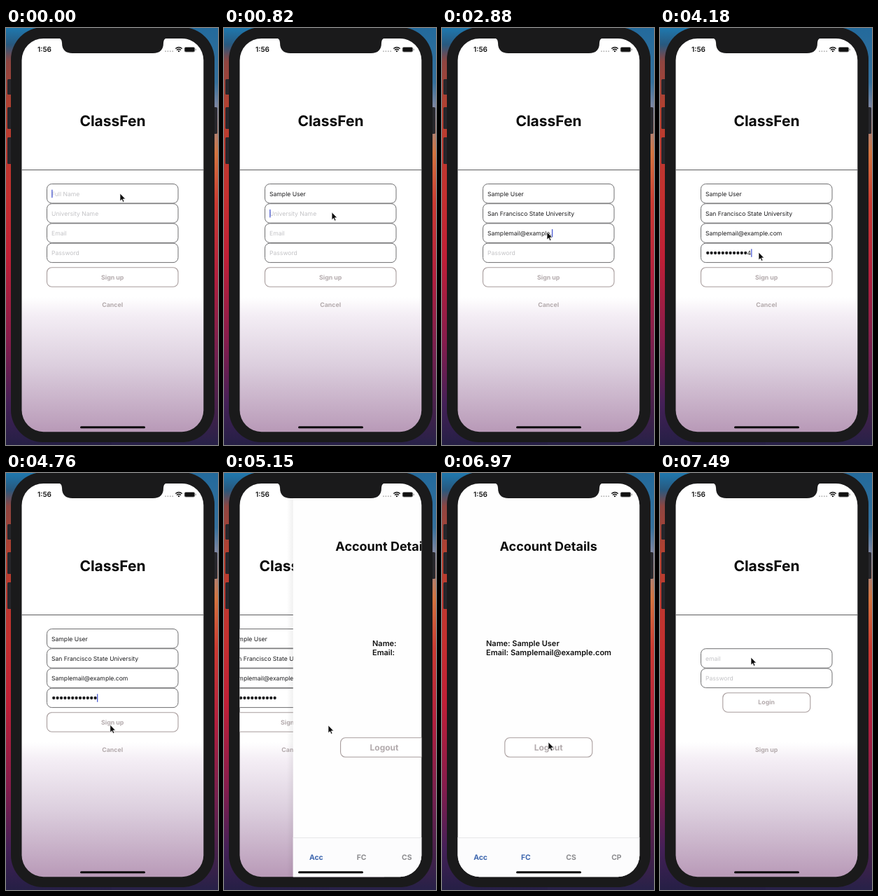
These frames come from a looping animation (303x595 px, 7550 ms). An HTML page:

```html
<!DOCTYPE html>
<html lang="en">
<head>
<meta charset="utf-8">
<title>Sign-up demo</title>
<style>
  html, body { margin: 0; width: 100%; height: 100%; overflow: hidden; background: #1a1a1b; }
  svg { display: block; width: 100%; height: 100%; }
  text { font-family: Inter, "Liberation Sans", sans-serif; white-space: pre; text-rendering: geometricPrecision; }
  .mid { text-anchor: middle; }
  .title { font-size: 21px; font-weight: 700; fill: #080808; }
  .head { font-size: 18px; font-weight: 700; fill: #0c0c0c; }
  .input { font-size: 8.6px; fill: #1c1c1e; }
  .hint { fill: #c3c3c6; }
  .link { font-size: 8.8px; font-weight: 700; fill: #b4abad; }
  .logout { font-size: 12px; font-weight: 700; fill: #b3abad; }
  .info { font-size: 11px; font-weight: 600; fill: #111; }
  .tab { font-size: 10.4px; font-weight: 700; fill: #8d8d90; }
  .tab.on { fill: #3d66ae; }
  .clock { font-size: 10px; font-weight: 600; fill: #111; }
  .box { fill: #fff; stroke: #6e6e70; }
  .btn { fill: #fff; stroke: #a89d9d; stroke-width: 1.1; }
</style>
</head>
<body>
<svg viewBox="0 0 303 595" preserveAspectRatio="none">
  <defs>
    <linearGradient id="wallL" x1="0" y1="0" x2="0" y2="1">
      <stop offset="0" stop-color="#1f78ae"/>
      <stop offset=".04" stop-color="#28597f"/>
      <stop offset=".08" stop-color="#8f4540"/>
      <stop offset=".2" stop-color="#b5402f"/>
      <stop offset=".4" stop-color="#c4302f"/>
      <stop offset=".55" stop-color="#c01f36"/>
      <stop offset=".75" stop-color="#861c4c"/>
      <stop offset=".9" stop-color="#442057"/>
      <stop offset="1" stop-color="#251f45"/>
    </linearGradient>
    <linearGradient id="wallR" x1="0" y1="0" x2="0" y2="1">
      <stop offset="0" stop-color="#236a9c"/>
      <stop offset=".13" stop-color="#34709c"/>
      <stop offset=".2" stop-color="#8b8aa2"/>
      <stop offset=".3" stop-color="#d3743f"/>
      <stop offset=".42" stop-color="#cb3a32"/>
      <stop offset=".6" stop-color="#b21f3e"/>
      <stop offset=".78" stop-color="#74204f"/>
      <stop offset="1" stop-color="#272148"/>
    </linearGradient>
    <linearGradient id="haze" gradientUnits="userSpaceOnUse" x1="0" y1="384" x2="0" y2="577">
      <stop offset="0" stop-color="#fff"/>
      <stop offset=".13" stop-color="#f4eef5"/>
      <stop offset=".5" stop-color="#dccfde"/>
      <stop offset="1" stop-color="#b899b7"/>
    </linearGradient>
    <linearGradient id="shade">
      <stop offset="0" stop-color="#000" stop-opacity="0"/>
      <stop offset="1" stop-color="#000" stop-opacity=".06"/>
    </linearGradient>
    <clipPath id="screen"><rect x="22.5" y="15" width="259.8" height="561.2" rx="31"/></clipPath>
  </defs>

  <rect width="152" height="595" fill="url(#wallL)"/>
  <rect x="151" width="152" height="595" fill="url(#wallR)"/>
  <g fill="#26262b">
    <rect x="2" y="73" width="7" height="22" rx="1.5"/>
    <rect x="2" y="113" width="7" height="31" rx="1.5"/>
    <rect x="2" y="156" width="7" height="38" rx="1.5"/>
    <rect x="296" y="113" width="6" height="38" rx="1.5"/>
  </g>
  <rect x="7" y="-1" width="291" height="592" rx="46" fill="#1a1a1b"/>

  <g clip-path="url(#screen)">
    <g id="signup"></g>
    <g id="login"></g>
    <g id="account"></g>
    <rect x="106" y="568.2" width="93" height="3" rx="1.5" fill="#0a0a0a"/>
  </g>

  <path d="M74 14Q80 15 80 21Q80 36 95 36H210Q225 36 225 21Q225 15 231 14Z" fill="#1a1a1b"/>
  <text class="clock" x="45" y="34.3">1:56</text>
  <path d="M228 33.2H239" stroke="#aaa" stroke-width="1.7" stroke-linecap="round" stroke-dasharray="0 3.4"/>
  <g fill="none" stroke="#111" stroke-width="1.5">
    <path d="M242.3 29.5Q247 25.4 251.7 29.5"/>
    <path d="M244 31.5Q247 29 250 31.5"/>
  </g>
  <circle cx="247" cy="33.2" r="1.1" fill="#111"/>
  <rect x="255.2" y="27.5" width="14.5" height="6.6" rx="1.8" fill="#111" stroke="#777" stroke-width=".8"/>
  <path d="M271.2 29.6V32" stroke="#888"/>

  <path id="mouse" d="M0 0V11L2.5 8.7L4.2 12.4L6 11.6L4.3 8H7.7Z" fill="#0a0a0a" stroke="#fff" stroke-width=".7"/>
</svg>
<script>
const LOOP = 7550, PUSH = 4950, POP = 7000, LOADED = 5450, FC_TAP = 6050;
const WIDTH = 260, PARALLAX = 78, DOT = 5.4;
const USER = 'Sample User', MAIL = 'Samplemail@example.com';

// hint, focus time, typing start, typing end, value
const FIELDS = [
  ['Full Name', 0, 120, 640, USER],
  ['University Name', 820, 870, 1677, 'San Francisco State University'],
  ['Email', 2080, 2180, 2980, MAIL],
  ['Password', 3330, 3450, 4150, 'lake7field24']
];

// time, x, y of the pointer tip
const PATH = [
  [0, 163, 236], [660, 163, 236], [830, 154, 263], [1760, 154, 263],
  [2060, 150, 291], [3040, 150, 291], [3310, 141, 320], [4330, 141, 320],
  [4800, 149, 360], [5260, 149, 360], [5760, 117, 552], [6150, 117, 552],
  [6700, 152, 384], [7130, 152, 384], [7440, 130, 263], [LOOP, 130, 263]
];

const $ = id => document.getElementById(id);
const label = (cls, x, y, s, id = '') => `<text class="${cls}" id="${id}" x="${x}" y="${y}">${s}</text>`;
const rect = (cls, x, y, w) => `<rect class="${cls}" x="${x}" y="${y}" width="${w}" height="27.5" rx="7"/>`;
const fieldTop = i => 222.5 + 28.2 * i;
const field = (i, hint, id = '') =>
  rect('box', 58.5, fieldTop(i), 187.5) + label('input hint', 65, fieldTop(i) + 17.2, hint, id);
const backdrop = `<rect x="22" width="262" height="595" fill="url(#haze)"/>
  <path d="M22 202.5H284" stroke="#5c5c5e"/>` + label('title mid', 152.5, 140, 'ClassFen');

$('signup').innerHTML = backdrop +
  FIELDS.map((f, i) => field(i, f[0], 'in' + i)).join('') +
  `<path id="dots" stroke="#1c1c1e" stroke-width="4.3" stroke-linecap="round" stroke-dasharray="0 ${DOT}"/>
   <rect id="caret" width="1.3" height="11.5" fill="#4a5ad2"/>` +
  rect('btn', 58.5, 341.7, 187.5) +
  label('link mid', 152.2, 358.7, 'Sign up') +
  label('link mid', 152.2, 398.2, 'Cancel');

$('login').innerHTML = backdrop + field(1, 'email') + field(2, 'Password') +
  rect('btn', 89.8, 313.7, 125) +
  label('link mid', 152.2, 330.3, 'Login') +
  label('link mid', 152.2, 398.2, 'Sign up');

$('account').innerHTML =
  `<rect x="13" width="9" height="595" fill="url(#shade)"/>
   <rect x="22" width="263" height="595" fill="#fefefe"/>
   <rect x="22" y="520" width="263" height="75" fill="#fcfcfd"/>
   <path d="M22 520.5H285" stroke="#e6e6e8"/>` +
  label('head mid', 152.2, 111.2, 'Account Details') +
  label('info', 64, 246.7, '', 'name') + label('info', 64, 260, '', 'mail') +
  rect('btn', 89.8, 377.8, 125) + label('logout mid', 152.2, 396.2, 'Logout') +
  ['Acc', 'FC', 'CS', 'CP'].map((s, i) => label('tab mid', 55 + 64.8 * i, 551.8, s, 'tab' + i)).join('');
$('tab0').classList.add('on');

function pointer(t) {
  const i = PATH.findIndex(p => p[0] > t);
  const [t0, x0, y0] = PATH[i - 1], [t1, x1, y1] = PATH[i];
  const k = (t - t0) / (t1 - t0), e = k * k * (3 - 2 * k);
  return [x0 + (x1 - x0) * e, y0 + (y1 - y0) * e];
}

// Overdamped slide that comes fully to rest
const slide = (age, tau) => age < 0 ? 0 : Math.min(1, 1.01 * (1 - Math.exp(-age / tau)));

function drawFields(t) {
  let focus = 0;
  FIELDS.forEach(([hint, at, start, end, value], i) => {
    if (t >= at) focus = i;
    const k = Math.min(1, Math.max(0, (t - start) / (end - start)));
    const n = Math.floor(k * value.length + 1e-6);
    const el = $('in' + i);
    el.classList.toggle('hint', !n);
    if (i < 3) {
      el.textContent = n ? value.slice(0, n) : hint;
    } else {
      const shown = n > 0 && t < end + 250;
      const dots = shown ? n - 1 : n;
      el.textContent = n ? (shown ? value[n - 1] : '') : hint;
      el.setAttribute('x', 65 + dots * DOT);
      $('dots').setAttribute('d', dots ? `M68.2 321h${(dots - 1) * DOT + .1}` : '');
    }
    if (focus === i) {
      const x = +el.getAttribute('x') + (n ? el.getComputedTextLength() : 0);
      $('caret').setAttribute('x', x + .2);
      $('caret').setAttribute('y', fieldTop(i) + 8.2);
    }
  });
  $('caret').style.display = t < PUSH - 60 ? '' : 'none';
}

function shift(id, x, visible) {
  $(id).style.display = visible ? '' : 'none';
  $(id).setAttribute('transform', `translate(${x} 0)`);
}

function draw(t) {
  drawFields(t);
  const pushed = slide(t - PUSH, 168), popped = slide(t - POP, 85);
  shift('signup', -PARALLAX * pushed, pushed < 1);
  shift('login', -PARALLAX * (1 - popped), t >= POP);
  shift('account', WIDTH * (1 - pushed + popped), t >= PUSH && popped < 1);

  const loaded = t >= LOADED;
  $('name').textContent = 'Name:' + (loaded ? ' ' + USER : '');
  $('mail').textContent = 'Email:' + (loaded ? ' ' + MAIL : '');
  const wide = Math.max($('name').getComputedTextLength(), $('mail').getComputedTextLength());
  for (const id of ['name', 'mail']) $(id).setAttribute('x', 152.5 - wide / 2);
  $('tab1').classList.toggle('on', t >= FC_TAP);

  $('mouse').setAttribute('transform', `translate(${pointer(t)})`);
}

const begin = performance.now();
function tick() {
  draw((performance.now() - begin) % LOOP);
  requestAnimationFrame(tick);
}
tick();
</script>
</body>
</html>
```
